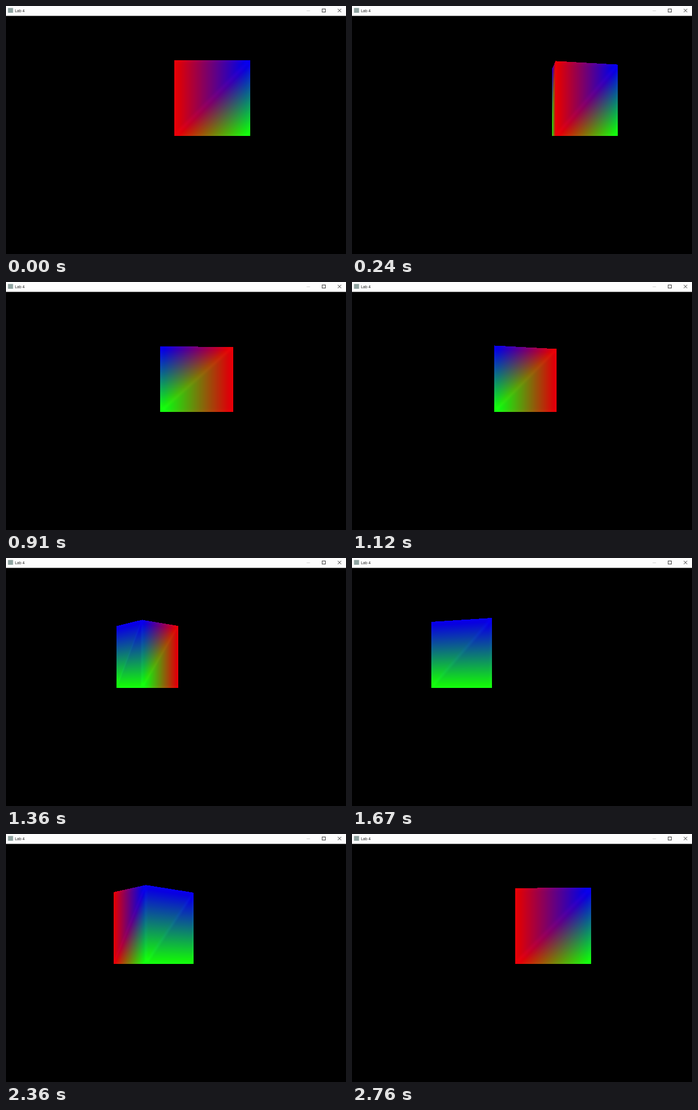
Animation, 600 px wide and 439 px high, one loop 2.79 s. Source, as an HTML page with a canvas:

```html
<!DOCTYPE html>
<html lang="en">
<head>
<meta charset="utf-8">
<title>Lab 4</title>
<style>
  html, body { margin: 0; width: 100%; height: 100%; overflow: hidden; background: #000; }
  canvas, svg { position: absolute; left: 0; top: 0; display: block; }
  text { font: 6.8px "Open Sans", "Noto Sans", sans-serif; fill: #111; }
</style>
</head>
<body>
<canvas id="view" width="600" height="439"></canvas>
<svg width="600" height="18" viewBox="0 0 600 18">
  <rect width="600" height="17.5" fill="#fdfdfd"/>
  <rect x="3.5" y="3.5" width="9" height="8.5" fill="#8fa3a0"/>
  <text x="15.7" y="10.6">Lab 4</text>
  <g fill="none" stroke="#222" stroke-width="0.9">
    <path d="M530.5 8.5h6" stroke="#ccc"/>
    <rect x="558" y="5.2" width="5.6" height="5.6"/>
    <path d="M585.5 5l6 6m0-6l-6 6"/>
  </g>
</svg>
<script>
const LOOP = 2790, STEP = 30;
const FOCAL = 1203, DISTANCE = 10, CENTER_X = 300, BASE_Y = 229.5;
const RED = [234, 0, 8], GREEN = [20, 255, 14], BLUE = [8, 0, 238];

// Upright edges of the prism: floor position and colours at top and bottom.
const redEdge = { x: 0, z: 1, top: RED, bottom: RED };
const rightEdge = { x: 1, z: 1, top: BLUE, bottom: GREEN };
const backEdge = { x: 0.5, z: 0, top: BLUE, bottom: GREEN };
const faces = [[redEdge, rightEdge], [backEdge, redEdge], [rightEdge, backEdge]];

// Runs of even steps: [start, last step]; the last step holds until the next run.
const runs = [[0, 450], [520, 1600], [1640, 2690], [2730, 2760]];

// Turn of the prism: [ms, degrees].
const turn = [
  [0, -1.2], [450, 51.2], [520, 62], [910, 118.8], [1360, 178],
  [2000, 247.5], [2360, 299.3], [2760, 354.8], [2790, 358.8]
];

const ctx = document.getElementById("view").getContext("2d");
const image = ctx.createImageData(600, 439);

function stepTime(t) {
  const [start, last] = runs.findLast(run => t >= run[0]);
  return Math.min(last, start + Math.floor((t - start) / STEP) * STEP);
}

function angleAt(t) {
  const i = turn.findIndex(key => key[0] > t);
  const [t0, a0] = turn[i - 1], [t1, a1] = turn[i];
  return (a0 + (a1 - a0) * (t - t0) / (t1 - t0)) * Math.PI / 180;
}

function project(edge, angle) {
  const c = Math.cos(angle), s = Math.sin(angle);
  const height = FOCAL / (DISTANCE - edge.z * c + edge.x * s);
  return { x: CENTER_X + (edge.x * c + edge.z * s) * height, height };
}

const firm = w => Math.max(0, Math.min(1, w * 1.12 - 0.06));

// Each face is split from bottom left to top right.
function shade(left, right, u, v, at) {
  const upper = v > u;
  const corner = upper ? left.top : right.bottom;
  const a = firm(Math.abs(v - u));
  const b = firm(upper ? u : v);
  const c = firm(1 - (upper ? v : u));
  for (let k = 0; k < 3; k++) {
    image.data[at + k] = corner[k] * a + right.top[k] * b + left.bottom[k] * c;
  }
}

function drawFace([left, right], angle) {
  const l = project(left, angle), r = project(right, angle);
  for (let x = Math.round(l.x); x < Math.round(r.x); x++) {
    const s = Math.max(0, Math.min(1, (x + 0.5 - l.x) / (r.x - l.x)));
    const height = l.height + (r.height - l.height) * s;
    const u = s * r.height / height;
    for (let y = Math.round(BASE_Y - height); y < BASE_Y; y++) {
      const v = Math.max(0, Math.min(1, (BASE_Y - y - 0.5) / height));
      shade(left, right, u, v, (y * 600 + x) * 4);
    }
  }
}

function draw(t) {
  const angle = angleAt(stepTime(t));
  new Uint32Array(image.data.buffer).fill(0xff000000);
  faces.forEach(face => drawFace(face, angle));
  ctx.putImageData(image, 0, 0);
}

const begin = performance.now();
function tick() {
  draw((performance.now() - begin) % LOOP);
  requestAnimationFrame(tick);
}
tick();
</script>
</body>
</html>
```
